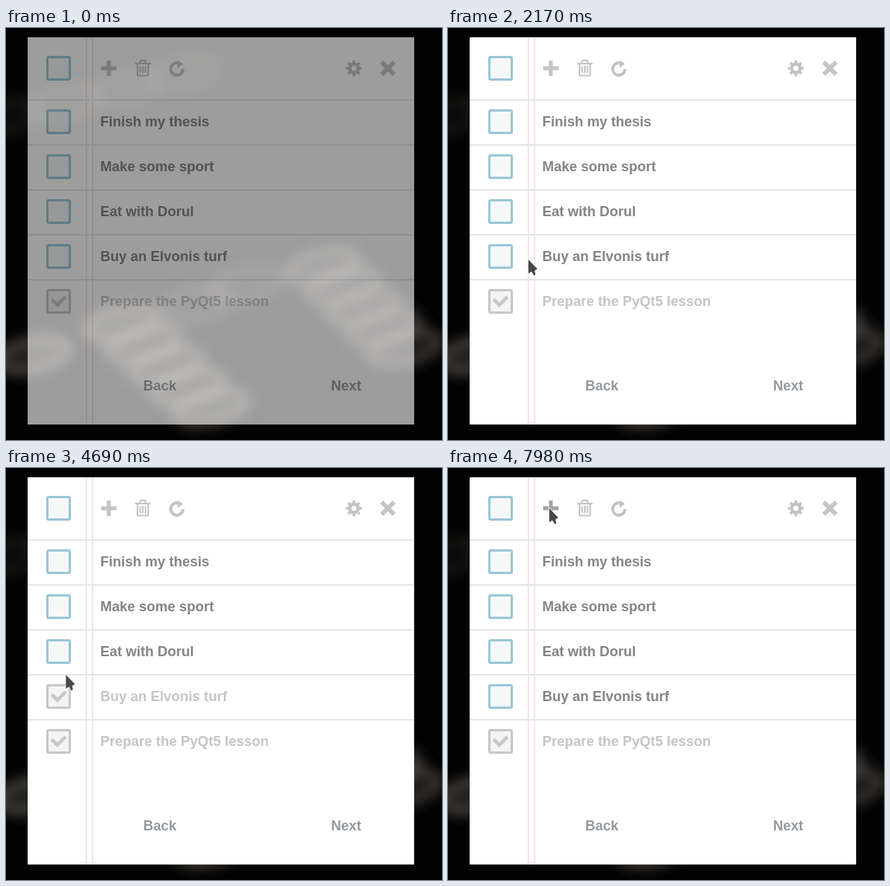
An HTML page for the animation above (8 s loop, 564x532 px).

```html
<!DOCTYPE html>
<html lang="en">
<head>
<meta charset="utf-8">
<title>To-do list</title>
<style>
  html, body { margin: 0; height: 100%; overflow: hidden; background: #030303; }
  svg { display: block; }
  text { font: bold 18px "Liberation Sans", Arial, sans-serif; fill: #838583; }
  .box { fill: #f6f8f8; stroke: #9ac7d8; stroke-width: 3; }
  .done .box { fill: #f4f4f4; stroke: #c8c8c8; }
  .done text { fill: #c5c5c5; }
  .check { fill: none; stroke: #c8c8c8; stroke-width: 4.5; }
  .rule { fill: #e4e6e9; }
  .margin { fill: #f6e6e4; }
  .icon { color: #c4c4c4; fill: currentColor; }
  .icon.hover { color: #a3a3a3; }
  .line { fill: none; stroke: currentColor; }
  .nav text { fill: #95999e; text-anchor: middle; }
</style>
</head>
<body>
<svg width="564" height="532" viewBox="0 0 564 532">
  <defs>
    <filter id="soft" x="-50%" y="-50%" width="200%" height="200%"><feGaussianBlur stdDeviation="8"/></filter>
    <clipPath id="listArea"><rect x="28" y="92" width="500" height="340"/></clipPath>
  </defs>

  <g id="photo" filter="url(#soft)" fill="#94897f" stroke="#94897f"></g>

  <g id="panel">
    <rect x="28" y="12" width="500" height="500" fill="#fff"/>
    <rect class="margin" x="103" y="12" width="2" height="500"/>
    <rect class="margin" x="111" y="12" width="2" height="500"/>
    <rect class="box" x="53.5" y="37.5" width="29" height="29" rx="1.5"/>
    <g class="icon" data-x="133" transform="translate(133 52)">
      <path class="line" stroke-width="5" d="M-10 0H10M0-10V10"/>
    </g>
    <g class="icon" data-x="177" transform="translate(177 52)">
      <path class="line" stroke-width="2" d="M-10-6H10M-4-6l1-4h6l1 4M-7-6V8q0 1.500 1.500 1.500h11q1.500 0 1.500-1.500V-6M-3.500-3V6M0-3V6M3.500-3V6"/>
    </g>
    <g class="icon" data-x="221" transform="translate(221 52)">
      <path class="line" stroke-width="4" d="M8 1A8 8 0 1 1 1-7"/>
      <path d="M1-10.500L8-5.500L1-.5z"/>
    </g>
    <g class="icon" data-x="450" transform="translate(450 52)">
      <circle class="line" r="5.500" stroke-width="4.500"/>
      <circle class="line" r="8.500" stroke-width="3.600" pathLength="16" stroke-dasharray="1" stroke-dashoffset=".5"/>
    </g>
    <g class="icon" data-x="494" transform="translate(494 52)">
      <path class="line" stroke-width="5.500" d="M-8-8L8 8M8-8L-8 8"/>
    </g>
    <g clip-path="url(#listArea)"><g id="list"></g></g>
    <g class="nav"><text x="199" y="468">Back</text><text x="440" y="468">Next</text></g>
  </g>

  <path id="cursor" d="M0 0V18L4 15.500L7.500 21L9 18.500L8 14.500L11.500 12z" fill="#484848"
        stroke="#fff" stroke-opacity=".75" stroke-width="2" paint-order="stroke"/>
</svg>

<script>
const LOOP = 8000, STEP = 70, ROW = 58, LONGEST_MOVE = 560;
const el = id => document.getElementById(id);
const progress = (t, from, to) => Math.max(0, Math.min(1, (t - from) / (to - from)));
const smooth = p => p * p * (3 - 2 * p);
const easeOut = p => 1 - (1 - p) ** 3;

const tasks = [
  { label: 'Finish my thesis' },
  { label: 'Make some sport', on: 5600, off: 7350 },
  { label: 'Eat with Dorul', on: 4970, off: 6230 },
  { label: 'Buy an Elvonis turf', on: 4410, off: 6790 },
  { label: 'Prepare the PyQt5 lesson', on: -STEP }
];

// Stops of the pointer: arrival time, x, y
const stops = [
  [630, 90, 194], [700, 283, 194], [1050, 359, 157], [1470, 359, 157], [1820, 200, 27],
  [2100, 104, 299], [2380, 173, 268], [2800, 194, 133], [3500, 115, 306], [3780, 77, 303],
  [4200, 79, 292], [4970, 76, 242], [5880, 70, 171], [6440, 70, 275], [6720, 72, 297],
  [7210, 72, 178], [7910, 131, 52]
];

// Each move starts one step after the last stop, or later if there is time to rest.
function pointerAt(t) {
  let [last, x, y] = stops[0];
  for (const [arrive, nextX, nextY] of stops.slice(1)) {
    const p = smooth(progress(t, Math.max(last + STEP, arrive - LONGEST_MOVE) - 1, arrive));
    x += (nextX - x) * p;
    y += (nextY - y) * p;
    last = arrive;
  }
  return [x, y];
}

// Blurred beads strung between two points
function beads(count, x1, y1, x2, y2, opacity) {
  for (let i = 0; i < count; i++) {
    const p = count > 1 ? i / (count - 1) : 0;
    el('photo').innerHTML += `<ellipse rx="46" ry="19" opacity="${opacity}" fill-opacity=".45" stroke-width="12"
      transform="translate(${x1 + (x2 - x1) * p} ${y1 + (y2 - y1) * p}) rotate(-12)"/>`;
  }
}
beads(5, 150, 382, 265, 490, .45);
beads(5, 410, 308, 515, 413, .38);
beads(2, 245, 358, 310, 332, .2);
beads(1, 36, 422, 36, 422, .45);
beads(4, 0, 115, 230, 60, .12);

const face = (label, y, done) => `<g class="${done ? 'done' : 'open'}">
  <rect class="box" x="53.5" y="${y - 14.5}" width="29" height="29" rx="1.5"/>
  ${done ? `<path class="check" d="M59 ${y - 2.5}l7.500 7l10.500-10.500"/>` : ''}
  <text x="122" y="${y + 6}">${label}</text></g>`;

el('list').innerHTML = tasks.map(({ label }, i) => {
  const y = 121 + ROW * i;
  return `<rect class="rule" x="28" y="${y - 29}" width="500" height="2"/>` +
    face(label, y, false) + face(label, y, true);
}).join('');

const open = document.querySelectorAll('.open'), done = document.querySelectorAll('.done');
const icons = document.querySelectorAll('.icon');

function draw() {
  const t = Math.floor(performance.now() % LOOP / STEP) * STEP;
  const [x, y] = pointerAt(t);
  const fade = (time = Infinity) => time < Infinity ? progress(t, time - STEP, time + STEP) : 0;
  const scroll = 62.3 * (smooth(progress(t, 2520, 2800)) - easeOut(progress(t, 2870, 3360)));

  el('panel').setAttribute('opacity', .61 + .39 * easeOut(progress(t, 1120, 1330)));
  el('list').setAttribute('transform', `translate(0 ${-scroll})`);
  el('cursor').setAttribute('transform', `translate(${x} ${y})`);
  el('cursor').setAttribute('visibility', t < stops[0][0] ? 'hidden' : 'visible');
  tasks.forEach(({ on, off }, i) => {
    const level = fade(on) - fade(off);
    open[i].setAttribute('opacity', 1 - level);
    done[i].setAttribute('opacity', level);
  });
  icons.forEach(icon => icon.classList.toggle('hover',
    Math.hypot(x - icon.dataset.x, y - 52) < 12));
  requestAnimationFrame(draw);
}
draw();
</script>
</body>
</html>
```
